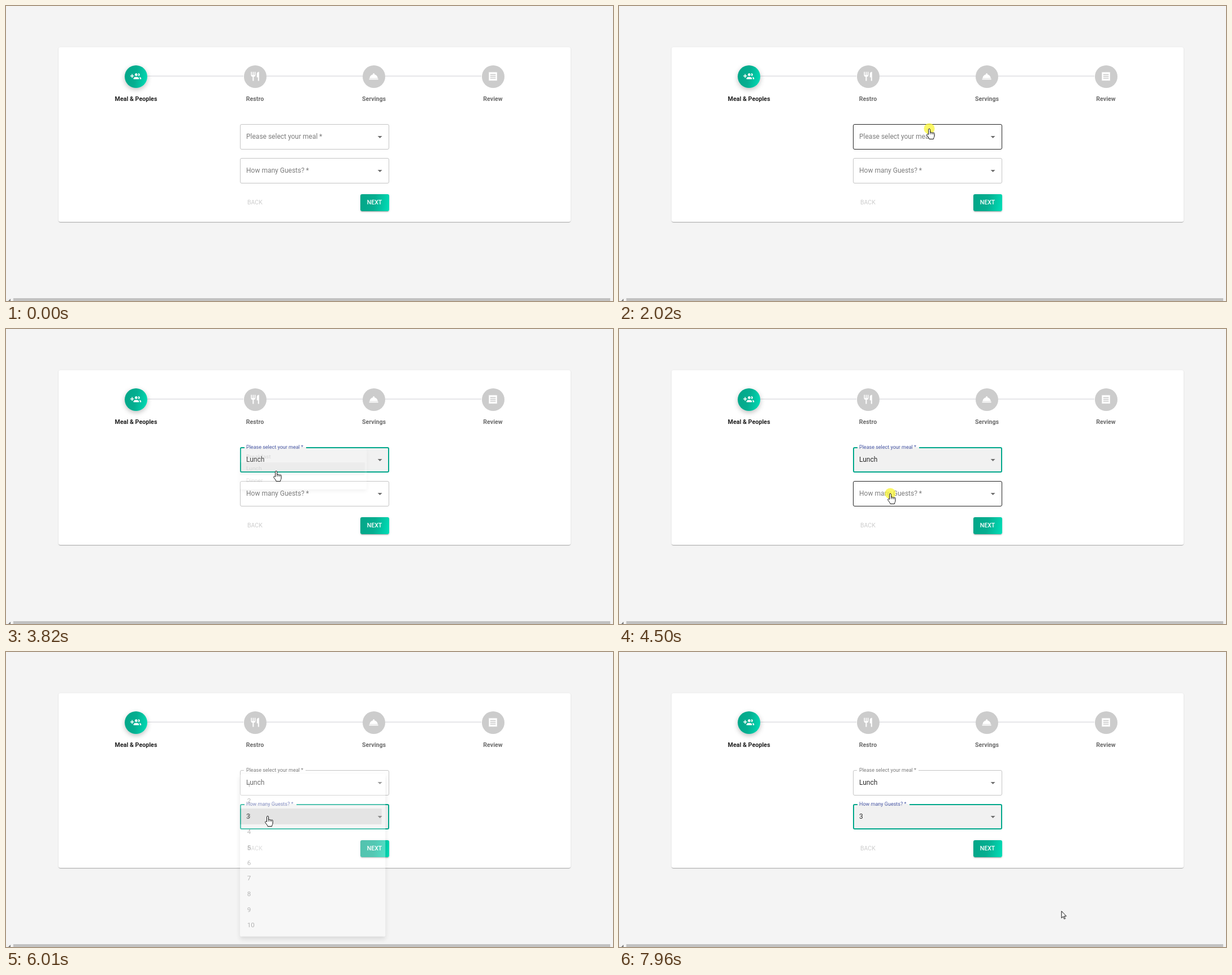
An HTML page for the animation above (8 s loop, 1074 px wide and 522 px high).

```html
<!DOCTYPE html>
<html lang="en">
<head>
<meta charset="utf-8">
<title>Meal booking form</title>
<style>
html, body { margin: 0; width: 100%; height: 100%; overflow: hidden; background: #f4f4f4; }
body { position: relative; font: 12px/1 Roboto, Inter, sans-serif; color: #2b2b2b; }
body *, body *::before { box-sizing: border-box; }
/* every animation shares one 8 s clock; 1% = 80 ms */
.a { animation: 8s step-end infinite; }
:root { --ease: cubic-bezier(.4, 0, .2, 1); }

.card {
  position: absolute; left: 93px; top: 73px; width: 906px; height: 309px;
  background: #fff; border-radius: 3px;
  box-shadow: 0 1.6px .8px -.8px rgba(0,0,0,.2), 0 .8px .8px rgba(0,0,0,.14), 0 .8px 2.4px rgba(0,0,0,.12);
}

/* stepper */
.line { position: absolute; top: 122.5px; height: 2.5px; width: 170px; background: #e6e6e9; }
.step { position: absolute; top: 104.5px; width: 120px; margin-left: -60px; text-align: center;
  font-size: 10.7px; font-weight: 600; color: #6d6d6d; }
.step i { display: block; width: 40px; height: 40px; margin: 0 auto 15.5px; padding: 10.4px; border-radius: 50%; background: #ccc; }
.step svg { display: block; width: 19.2px; height: 19.2px; fill: #fff; }
.step.on { color: #222; }
.step.on i, .next { background: linear-gradient(100deg, #02a688, #05ae90 48%, #00dfb8); }
.step.on i { box-shadow: 0 3px 8px rgba(0,0,0,.25); }

/* select fields */
.field { position: absolute; left: 414px; width: 264px; height: 45px; line-height: 45px; border-radius: 3px; }
.field > * { position: absolute; }
.field fieldset { inset: -5px 0 0; margin: 0; padding: 0 6.4px; min-width: 0; border: 1px solid #c4c4c4; border-radius: 3px; }
.field legend { padding: 0; width: 0; height: 11px; }
.field label { left: 11px; top: 0; white-space: nowrap; color: #7d7d7d; transform-origin: 0 50%; }
.field b { left: 11px; font-weight: 400; opacity: 0; }
.field svg { left: 238.4px; top: 12.6px; width: 19.2px; height: 19.2px; fill: #6f6f6f; }
#meal { top: 209px; animation-name: fill1; }
#guests { top: 269px; animation-name: fill2; }
#meal fieldset { animation-name: edge1; }
#guests fieldset { animation-name: edge2; }
#meal legend { animation-name: notch1; }
#guests legend { animation-name: notch2; }
#meal label { animation-name: float1, tint1; }
#guests label { animation-name: float2, tint2; }
#meal b { animation-name: value1; }
#guests b { animation-name: value2; }
@keyframes fill1 { 27% { background: #f1f1f1; } 57.125%, 100% { background: none; } }
@keyframes fill2 { 57.125%, 100% { background: #f1f1f1; } }
@keyframes edge1 {
  0% { border: 1px solid #c4c4c4; } 21% { border: 1px solid #222; }
  27% { border: 2px solid #00a78b; } 57.125%, 100% { border: 1px solid #c4c4c4; }
}
@keyframes edge2 {
  0%, 20.1375% { border: 1px solid #c4c4c4; } 19.275%, 50.9625% { border: 1px solid #222; }
  57.125%, 100% { border: 2px solid #00a78b; }
}
@keyframes notch1 { 0% { width: 0; } 27% { width: 0; animation-timing-function: ease-out; } 28.25%, 100% { width: 109px; } }
@keyframes notch2 { 0% { width: 0; } 57.125% { width: 0; animation-timing-function: ease-out; } 58.375%, 100% { width: 92px; } }
@keyframes float1 {
  0% { transform: none; } 27% { transform: none; animation-timing-function: cubic-bezier(0,0,.2,1); }
  29.5%, 100% { transform: translateY(-22px) scale(.75); }
}
@keyframes float2 {
  0% { transform: none; } 57.125% { transform: none; animation-timing-function: cubic-bezier(0,0,.2,1); }
  59.625%, 100% { transform: translateY(-22px) scale(.75); }
}
@keyframes tint1 { 27% { color: #4a59a6; } 57.125%, 100% { color: #7d7d7d; } }
@keyframes tint2 { 57.125%, 100% { color: #4a59a6; } }
@keyframes value1 { 46%, 100% { opacity: 1; } }
@keyframes value2 { 73.5%, 100% { opacity: 1; } }

/* buttons */
.btn { position: absolute; top: 333px; height: 30.4px; line-height: 30.4px; font-size: 10.5px; font-weight: 500; }
.back { left: 427px; color: #cdcdcd; font-weight: 400; }
.next { left: 626.5px; width: 51px; text-align: center; color: #fff; border-radius: 3px;
  box-shadow: 0 2.4px .8px -1.6px rgba(0,0,0,.2), 0 1.6px 1.6px rgba(0,0,0,.14), 0 .8px 4px rgba(0,0,0,.12); }

/* scrollbar */
.bar { position: absolute; left: 0; top: 517px; width: 1074px; height: 5px; background: #f1f1f1; animation-name: bar; }
.bar::before { content: ""; position: absolute; left: 13px; width: 1056px; height: 5px; background: #c1c1c1; }
.bar svg { position: absolute; left: 4px; top: 1px; width: 4px; height: 4px; fill: #777; }
@keyframes bar { 0%, 46%, 73.5%, 100% { opacity: 1; } 27%, 57.125% { opacity: 0; } }

/* menus */
.menu {
  position: absolute; left: 414px; width: 264px; margin: 0; padding: 6.4px 0; list-style: none;
  background: #fff; border-radius: 3px; transform-origin: 0 0; opacity: 0;
  box-shadow: 0 4px 4px -2.4px rgba(0,0,0,.2), 0 6.4px 8px .8px rgba(0,0,0,.14), 0 2.4px 11px 1.6px rgba(0,0,0,.12);
}
.menu li { position: relative; overflow: hidden; height: 28.8px; line-height: 28.8px; padding-left: 13px; }
.menu i { position: absolute; width: 432px; height: 432px; margin: -216px; border-radius: 50%; background: #222; opacity: 0; }
#meals { top: 210.6px; animation-name: fade1, grow1; }
#counts { top: 216.4px; animation-name: fade2, grow2; }
#meals .first { animation-name: hover1; }
#meals .pick { animation-name: hover2; }
#counts .pick { background: #f4f4f4; }
#meals i { left: 64px; top: 5px; animation-name: spread1, dim1; }
#counts i { left: 49px; top: 10px; animation-name: spread2, dim2; }
@keyframes fade1 {
  0%, 49.1%, 100% { opacity: 0; }
  27% { opacity: 0; animation-timing-function: var(--ease); } 30.1% { opacity: 1; }
  46% { opacity: 1; animation-timing-function: var(--ease); }
}
@keyframes grow1 {
  0%, 49.1%, 100% { transform: scale(.75, .5625); }
  27% { transform: scale(.75, .5625); animation-timing-function: var(--ease); } 29.1% { transform: scale(1); }
  47.05% { transform: scale(1); animation-timing-function: var(--ease); }
}
@keyframes fade2 {
  0%, 77.6%, 100% { opacity: 0; }
  57.125% { opacity: 0; animation-timing-function: var(--ease); } 61.25% { opacity: 1; }
  73.5% { opacity: 1; animation-timing-function: var(--ease); }
}
@keyframes grow2 {
  0%, 77.6%, 100% { transform: scale(.75, .5625); }
  57.125% { transform: scale(.75, .5625); animation-timing-function: var(--ease); } 59.875% { transform: scale(1); }
  74.85% { transform: scale(1); animation-timing-function: var(--ease); }
}
@keyframes hover1 { 0% { background: #f2f2f2; } 43.375%, 100% { background: #fff; } }
@keyframes hover2 { 0% { background: #fff; } 38.125% { background: #fcfcfc; } 43.375%, 100% { background: #f4f4f4; } }
@keyframes spread1 { 0% { transform: scale(0); } 43.375% { transform: scale(0); animation-timing-function: var(--ease); } 50.25%, 100% { transform: scale(1); } }
@keyframes spread2 { 0% { transform: scale(0); } 69.875% { transform: scale(0); animation-timing-function: var(--ease); } 76.75%, 100% { transform: scale(1); } }
@keyframes dim1 { 43.375% { opacity: .1; animation-timing-function: linear; } 46% { opacity: .26; animation-timing-function: linear; } 52.875%, 100% { opacity: 0; } }
@keyframes dim2 { 69.875% { opacity: .1; animation-timing-function: linear; } 73.5% { opacity: .27; animation-timing-function: linear; } 80.375%, 100% { opacity: 0; } }

/* pointer */
#pointer { position: absolute; left: 0; top: 0; width: 1px; height: 1px; overflow: visible; animation-name: move; }
#pointer path { fill: #fff; stroke: #111; stroke-width: 1; stroke-linejoin: round; }
#pointer .crease { fill: none; stroke-width: .8; }
#halo { fill: #f9f53c; fill-opacity: .78; opacity: 0; animation-name: press; }
#arrow { opacity: 0; animation-name: arrow; }
#hand { opacity: 0; animation-name: hand; }
@keyframes press {
  0%, 27.875%, 46%, 58.875%, 73.5%, 100% { opacity: 0; }
  25.25%, 43.375%, 56.25%, 69.875% { opacity: 1; }
}
@keyframes arrow {
  0%, 19.275%, 21%, 50.9625% { opacity: 0; }
  7.375%, 20.1375%, 50%, 83%, 100% { opacity: 1; }
}
@keyframes hand {
  0%, 20.1375%, 50%, 83%, 100% { opacity: 0; }
  19.275%, 21%, 50.9625% { opacity: 1; }
}
/* the pointer advances in even hops of about 70 ms */
@keyframes move {
  0% { transform: translate(1048px, 512px); }
  11.5% { transform: translate(1048px, 512px); animation-timing-function: steps(7, jump-both); }
  17.55% { transform: translate(640px, 370px); }
  18.4125% { transform: translate(640px, 370px); animation-timing-function: steps(3, jump-both); }
  21% { transform: translate(550px, 230px); }
  21.875% { transform: translate(550px, 224px); }
  22.75% { transform: translate(549px, 217px); }
  32.5% { transform: translate(549px, 217px); animation-timing-function: steps(4, jump-both); }
  36.375% { transform: translate(497px, 228px); }
  37.25% { transform: translate(490px, 238px); }
  38.125% { transform: translate(481px, 248px); }
  39% { transform: translate(479px, 250px); }
  40.125% { transform: translate(478px, 251px); }
  50% { transform: translate(478px, 251px); animation-timing-function: steps(3, jump-both); }
  52.875% { transform: translate(480px, 289px); }
  53.75% { transform: translate(480px, 291px); }
  64.875% { transform: translate(480px, 291px); animation-timing-function: steps(2, jump-both); }
  67.375% { transform: translate(463px, 290px); }
  76.875% { transform: translate(463px, 290px); animation-timing-function: steps(3, jump-both); }
  79.5% { transform: translate(510px, 304px); }
  80.375% { transform: translate(510px, 306px); animation-timing-function: steps(10, jump-both); }
  89.125% { transform: translate(614px, 335px); }
  94.125% { transform: translate(614px, 335px); animation-timing-function: steps(6, jump-both); }
  99.5%, 100% { transform: translate(782.5px, 458px); }
}
</style>
</head>
<body>
<div class="card"></div>

<div class="line" style="left:250px"></div>
<div class="line" style="left:460.5px"></div>
<div class="line" style="left:671px"></div>
<div class="step on" style="left:230px"><i><svg viewBox="0 0 24 24"><path d="M8 10H5V7H3v3H0v2h3v3h2v-3h3v-2zm10 1c1.66 0 2.99-1.34 2.99-3S19.66 5 18 5c-.32 0-.63.05-.91.14.57.81.9 1.79.9 2.86s-.34 2.04-.9 2.86c.28.09.59.14.91.14zm-5 0c1.66 0 2.99-1.34 2.99-3S14.66 5 13 5c-1.66 0-3 1.34-3 3s1.34 3 3 3zm6.62 2.16c.83.73 1.38 1.66 1.38 2.84v2h3v-2c0-1.54-2.37-2.49-4.38-2.84zM13 13c-2 0-6 1-6 3v2h12v-2c0-2-4-3-6-3z"/></svg></i>Meal &amp; Peoples</div>
<div class="step" style="left:440.5px"><i><svg viewBox="0 0 24 24"><path d="M11 9H9V2H7v7H5V2H3v7c0 2.12 1.66 3.84 3.75 3.97V22h2.5v-9.03C11.34 12.84 13 11.12 13 9V2h-2v7zm5-3v8h2.5v8H21V2c-2.76 0-5 2.24-5 4z"/></svg></i>Restro</div>
<div class="step" style="left:651px"><i><svg viewBox="0 0 24 24"><path d="M2 17h20v2H2zm11.84-9.21c.1-.24.16-.51.16-.79 0-1.1-.9-2-2-2s-2 .9-2 2c0 .28.06.55.16.79C6.25 8.6 3.27 11.93 3 16h18c-.27-4.07-3.25-7.4-7.16-8.21z"/></svg></i>Servings</div>
<div class="step" style="left:861.5px"><i><svg viewBox="0 0 24 24"><path d="M18 17H6v-2h12v2zm0-4H6v-2h12v2zm0-4H6V7h12v2zM3 22l1.5-1.5L6 22l1.5-1.5L9 22l1.5-1.5L12 22l1.5-1.5L15 22l1.5-1.5L18 22l1.5-1.5L21 22V2l-1.5 1.5L18 2l-1.5 1.5L15 2l-1.5 1.5L12 2l-1.5 1.5L9 2 7.5 3.5 6 2 4.5 3.5 3 2z"/></svg></i>Review</div>

<div id="meal" class="field a">
  <fieldset class="a"><legend class="a"></legend></fieldset>
  <label class="a">Please select your meal *</label><b class="a">Lunch</b>
  <svg viewBox="0 0 24 24"><path d="M7 10l5 5 5-5z"/></svg>
</div>
<div id="guests" class="field a">
  <fieldset class="a"><legend class="a"></legend></fieldset>
  <label class="a">How many Guests? *</label><b class="a">3</b>
  <svg viewBox="0 0 24 24"><path d="M7 10l5 5 5-5z"/></svg>
</div>
<div class="btn back">BACK</div>
<div class="btn next">NEXT</div>

<div class="bar a"><svg viewBox="0 0 4 4"><path d="M4 0V4H0z"/></svg></div>

<ul id="meals" class="menu a">
  <li class="first a">Breakfast</li><li class="pick a">Lunch<i class="a"></i></li><li>Dinner</li>
</ul>
<ul id="counts" class="menu a">
  <li>1</li><li>2</li><li class="pick">3<i class="a"></i></li><li>4</li><li>5</li>
  <li>6</li><li>7</li><li>8</li><li>9</li><li>10</li>
</ul>

<svg id="pointer" class="a">
  <circle id="halo" class="a" r="9.6"/>
  <path id="arrow" class="a" d="M.5.5V12.8L3.4 10 5.3 14.5 7.1 13.7 5.2 9.4H8.9Z"/>
  <g id="hand" class="a">
    <path d="M-1.5 10.5V1.8a1.5 1.5 0 0 1 3 0V7a1.4 1.4 0 0 1 2.6.4 1.4 1.4 0 0 1 2.5.5 1.3 1.3 0 0 1 2.4 1V13c0 2-1.4 3-1.6 5.5H0C-.3 16-3 14-4.3 11.5-5 10-3.2 9-1.5 10.5z"/>
    <path class="crease" d="M1.5 7V10M4.1 7.4V10M6.6 8V10.3"/>
  </g>
</svg>
</body>
</html>
```
